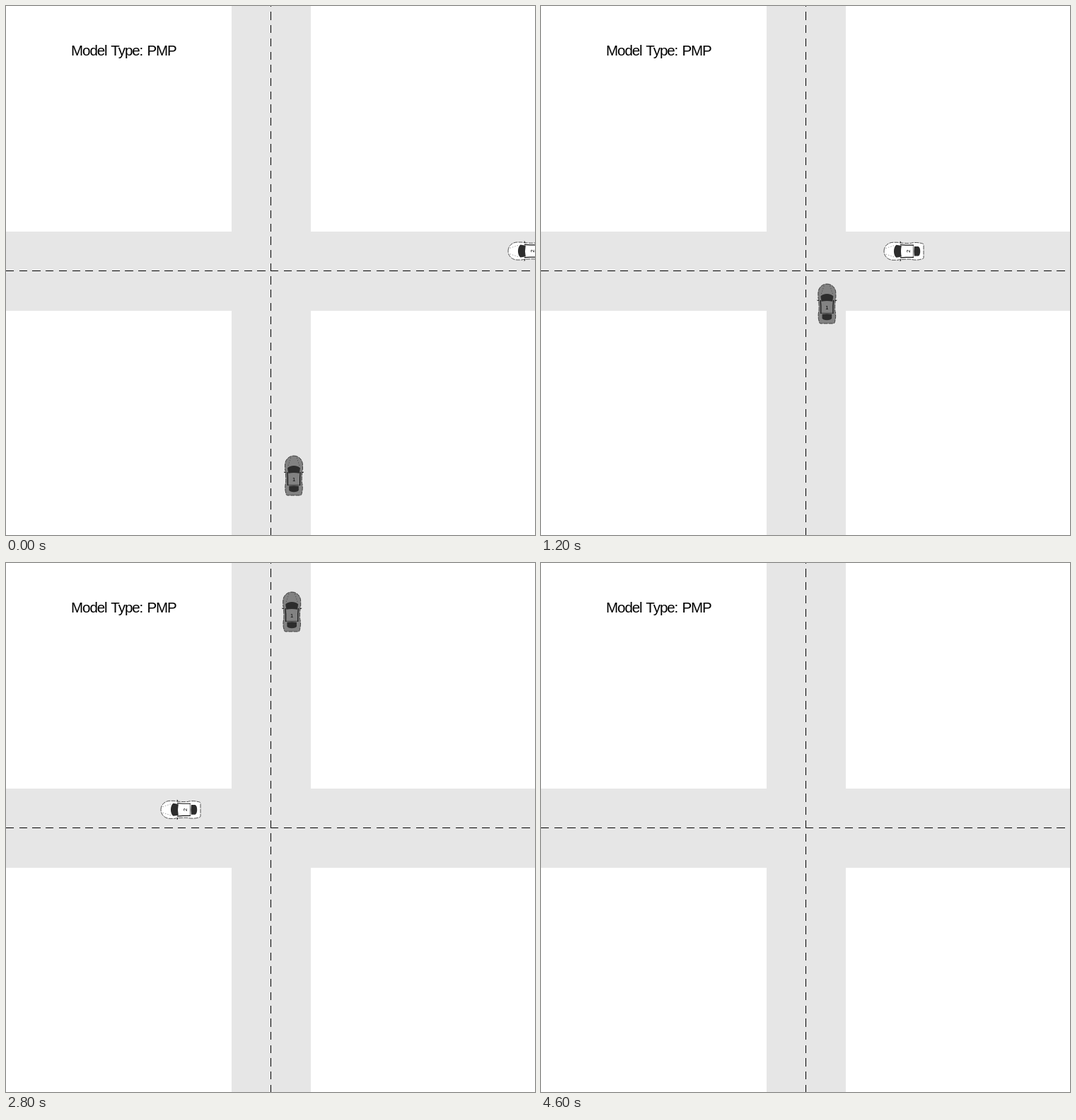
Write an HTML page that moves like this. It is 748 px wide and 748 px high and loops after 5800 ms.

```html
<!DOCTYPE html>
<html lang="en">
<head>
<meta charset="utf-8">
<title>Intersection</title>
<style>
  html, body { margin: 0; width: 100%; height: 100%; overflow: hidden; background: #fff; }
  svg { display: block; width: 100vw; height: 100vh; }
  text { font-family: "Liberation Sans", Arial, sans-serif; }
  .lane { stroke: #000; stroke-width: 1; stroke-dasharray: 11.2 7.5; shape-rendering: crispEdges; }
  .label { font-size: 20.5px; letter-spacing: -1.05px; word-spacing: 1.5px; }
  .number { font-size: 7.5px; text-anchor: middle; }
  .glass { fill: #2d2d2d; }
  .line { fill: none; stroke: #111; }
</style>
</head>
<body>
<svg viewBox="0 0 748 748">
  <defs>
    <path id="body" d="M0 -28C7 -28 12.5 -22.5 12.5 -15V-9C11.4 -5 11 5 11.4 10C12.6 14 12.6 20 11.4 24C11 27 10.4 28 8.5 28H-8.5C-10.4 28 -11 27 -11.4 24C-12.6 20 -12.6 14 -11.4 10C-11 5 -11.4 -5 -12.5 -9V-15C-12.5 -22.5 -7 -28 0 -28Z"/>
    <g id="trim">
      <use href="#body" class="line" stroke-width=".7" stroke-dasharray="6 1.2"/>
      <path class="line" d="M-11.2 -4L-14 -5M11.2 -4L14 -5"/>
      <path class="line" stroke-width=".4" stroke-dasharray="1.5 2" d="M-8 -14L-4 -26M8 -14L4 -26"/>
      <path class="line" stroke-width="1.2" d="M-9.2 -5L-8.6 3V14M9.2 -5L8.6 3V14"/>
      <path class="line" stroke-width=".6" d="M-8.5 13.3H8.5"/>
      <path class="glass" d="M-9 -10.5C-6 -15.2 6 -15.2 9 -10.5L7.8 -3.2Q0 -4.8 -7.8 -3.2Z"/>
      <path class="glass" d="M-6.8 14.8Q0 13.8 6.8 14.8V20.5Q5.5 23.2 0 23.2T-6.8 20.5Z"/>
    </g>
  </defs>
  <path fill="#e6e6e6" d="M319 0H431V319H748V431H431V748H319V431H0V319H319Z"/>
  <path class="lane" d="M0 374.5H748"/>
  <path class="lane" d="M374.5 749V0"/>
  <text class="label" x="92" y="69.5">Model Type: PMP</text>
  <g id="north">
    <use href="#body" fill="#828282"/>
    <use href="#trim"/>
    <text class="number" y="8">1</text>
  </g>
  <g id="west">
    <use href="#body" fill="#fff"/>
    <use href="#trim"/>
    <text class="number" y="8.5">2</text>
  </g>
</svg>
<script>
  const LOOP = 5800, STEP = 200, LAST = 23, HALF = 28;
  const north = document.getElementById("north");
  const west = document.getElementById("west");

  // Quadratic terms that fade out before, or set in after, a given step.
  const before = (k, end) => Math.max(0, 1 - k / end) ** 2;
  const after = (k, begin) => Math.max(0, k - begin) ** 2;

  function place(car, x, y, turn) {
    car.setAttribute("transform", `translate(${x} ${y}) rotate(${turn})`);
  }

  // Speeds up to 44.3 px per step, then eases off; drifts left at first.
  function driveNorth(k) {
    const nose = 658.4 - 44.3 * k - 22.4 * before(k, 5.5) + 0.1 * after(k, 9);
    place(north, 404.2 + 2.8 * before(k, 8), Math.round(nose) + HALF, 0);
  }

  // Brakes to 33.2 px per step, then slides slowly towards the centre line.
  function driveWest(k) {
    const nose = 683.9 - 33.2 * k + 26.4 * before(k, 7);
    place(west, Math.round(nose) + HALF, 346.5 + 0.26 * Math.max(0, k - 5), -90);
  }

  function draw(time) {
    const k = Math.min(LAST, Math.floor(time % LOOP / STEP));
    driveNorth(k);
    driveWest(k);
  }

  const start = performance.now();
  function tick() {
    draw(performance.now() - start);
    requestAnimationFrame(tick);
  }
  tick();
</script>
</body>
</html>
```
